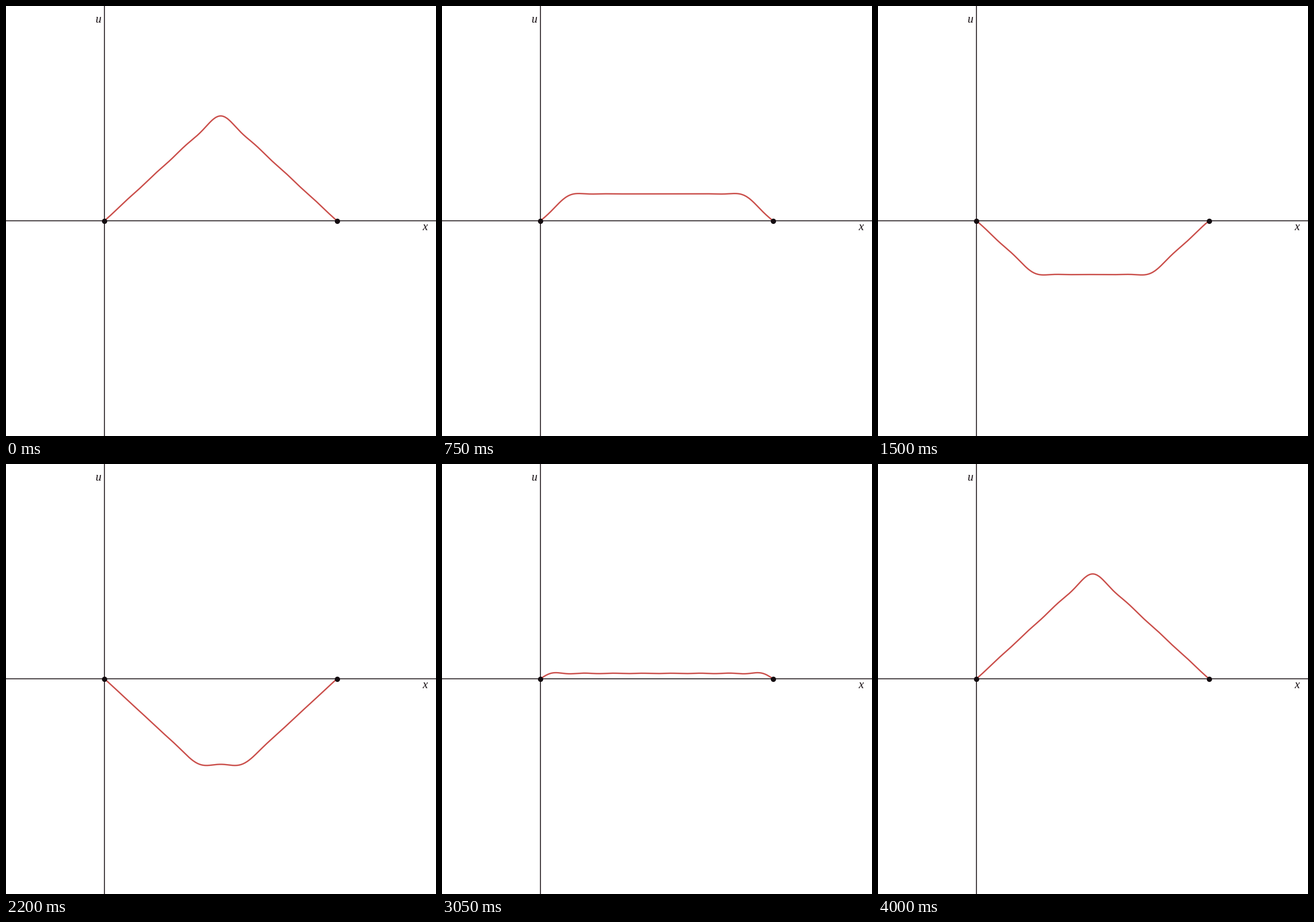
A matplotlib script for the animation above (4050 ms loop, 748 px wide and 748 px high).

```python
import numpy as np
import matplotlib.pyplot as plt
from matplotlib.animation import FuncAnimation

SIZE, DPI = 748, 68
PT = 72 / DPI                      # points per pixel
FRAMES, STEP_MS, PERIOD = 81, 50, 80
X0, X1, Y0 = 171.3, 575.7, 373.6   # string ends and rest height
LENGTH = X1 - X0
AMP = 0.375 * LENGTH
INK, RED = "#140c10", "#c74440"

MODES = np.arange(1, 16, 2)
SIGNS = np.where(MODES % 4 == 1, 1, -1)
s = np.linspace(0, 1, 500)
SHAPES = (SIGNS / MODES**2)[:, None] * np.sin(np.pi * np.outer(MODES, s))


def string_height(frame):
    """Plucked string as a sum of its odd standing waves."""
    phase = 2 * np.pi * frame / PERIOD
    return AMP * np.cos(MODES * phase) @ SHAPES


fig = plt.figure(figsize=(SIZE / DPI, SIZE / DPI), dpi=DPI, facecolor="white")
ax = fig.add_axes([0, 0, 1, 1])
ax.set(xlim=(0, SIZE), ylim=(SIZE, 0))
ax.axis("off")


def axis_line(xs, ys):
    ax.plot(xs, ys, color=INK, lw=1.5 * PT, snap=False, zorder=1)


def label(x, y, text):
    ax.text(x, y, text, family="Liberation Serif", style="italic",
            size=20 * PT, color=INK, ha="center", va="baseline")


axis_line([-5, SIZE + 5], [Y0, Y0])
axis_line([X0, X0], [-5, SIZE + 5])
label(161, 29, "u")
label(728.5, 389.5, "x")

curve, = ax.plot([], [], color=RED, alpha=0.95, lw=2.4 * PT,
                 solid_capstyle="round", solid_joinstyle="round", zorder=2)
ax.plot([X0, X1], [Y0, Y0], "o", color=INK, ms=9.2 * PT, mew=0,
        snap=False, zorder=3)


def update(frame):
    curve.set_data(X0 + LENGTH * s, Y0 - string_height(frame))
    return curve,


anim = FuncAnimation(fig, update, frames=FRAMES, interval=STEP_MS,
                     repeat=True, repeat_delay=0, blit=False)
plt.show()
```
